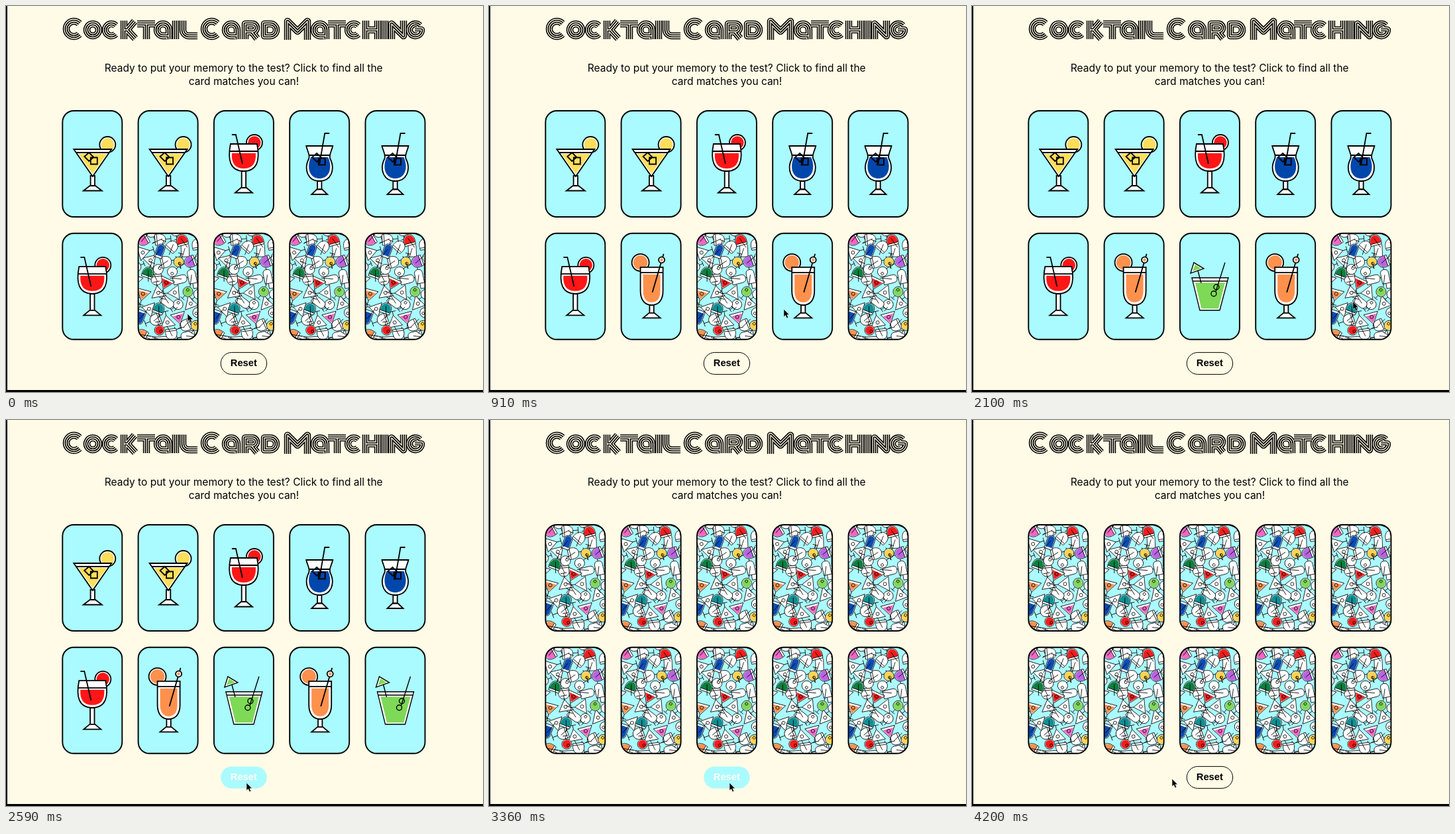
An HTML page for the animation above (4270 ms loop, 720x582 px).

```html
<!DOCTYPE html>
<html lang="en">
<head>
<meta charset="utf-8">
<title>Cocktail Card Matching</title>
<style>
  html, body { margin: 0; width: 100%; height: 100%; overflow: hidden; background: #fffbe6; }
  svg { display: block; }
  .intro { font: 15.5px Inter, "Open Sans", sans-serif; text-anchor: middle; }
  .label { font: bold 14.7px "Liberation Sans", Arial, sans-serif; text-anchor: middle; }
  .hidden-text { font: 44px Inter, sans-serif; text-anchor: middle; fill: transparent; }
</style>
</head>
<body>
<svg id="stage" width="720" height="582" viewBox="0 0 720 582">
  <defs>
    <clipPath id="cardClip"><rect x="-45" width="90" height="160" rx="17"/></clipPath>
  </defs>
  <rect width="720" height="582" fill="#fffbe6"/>
  <g id="title" fill="none" stroke-linejoin="round" aria-hidden="true"></g>
  <text class="hidden-text" x="359" y="50">Cocktail Card Matching</text>
  <text class="intro" x="358.7" y="99">Ready to put your memory to the test? Click to find all the</text>
  <text class="intro" x="359" y="119">card matches you can!</text>
  <g id="cards"></g>
  <rect id="button" x="324.2" y="522.4" width="69.4" height="33" rx="16.5"/>
  <text id="label" class="label" x="358.8" y="543">Reset</text>
  <path d="M0 0H2V582H0ZM0 579H720V582H0Z"/>
  <path id="cursor" d="M0 0V11.5L2.6 9.2 4.6 13.5 6.7 12.6 4.8 8.4H8.3Z" stroke="#fff" stroke-width=".5"/>
</svg>
<script>
const LOOP = 4270, STEP = 70, RESET = 3360;
const AQUA = '#aafbff', PAPER = '#fffbe6';
const byId = id => document.getElementById(id);

function add(parent, tag, attrs) {
  const el = document.createElementNS('http://www.w3.org/2000/svg', tag);
  for (const key in attrs) el.setAttribute(key, attrs[key]);
  return parent.appendChild(el);
}

// Title lettering: centre lines drawn as nested strokes.
const glyphs = {
  C: 'M19.6 3.4A11.5 11.5 0 1 0 19.6 19.6',
  M: 'M0 28V0L15 15L30 0V28',
  o: 'M9 0a9 9 0 1 0 .01 0Z',
  c: 'M15.4 2.6A9 9 0 1 0 15.4 15.4',
  k: 'M0 -5V23M0 9H5L16 -4M5 9L17 22',
  t: 'M-5 0H22M9 0V23',
  a: 'M18 23V9A9 9 0 1 0 9 18H18',
  i: 'M0 -5V23',
  l: 'M0 -5V9a9 9 0 0 0 9 9H22',
  r: 'M0 23V0H11a6 6 0 0 1 0 12H0M10 12L18 22',
  d: 'M0 0H9a9 9 0 0 1 0 18H0Z',
  h: 'M0 -5V23M18 -5V23M0 9H18',
  n: 'M0 23V0L18 18V-5',
  g: 'M15.4 2.6A9 9 0 1 0 18 9H8'
};
const lettering = 'CocktailCardMatching';
const letterX = [86, 117, 145, 173, 198, 223, 251, 262, 294, 326, 356, 385,
  420, 460, 486, 511, 538, 567, 577, 604];
[[10.4, '#000'], [7.3, PAPER], [4.7, '#000'], [1.3, PAPER]].forEach(([width, stroke]) => {
  const layer = add(byId('title'), 'g', { stroke, 'stroke-width': width });
  [...lettering].forEach((ch, i) => {
    const top = ch < 'a' ? 23 : 27;
    add(layer, 'path', { d: glyphs[ch], transform: `translate(${letterX[i] + 5} ${top})` });
  });
});

// Shapes for the card faces; x is measured from the card's centre line.
const line = (d, fill = 'none') => `<path d="${d}" fill="${fill}"/>`;
const solid = (d, fill) => `<path d="${d}" fill="${fill}" stroke="none"/>`;
const ring = (x, y, r, fill = 'none') => `<circle cx="${x}" cy="${y}" r="${r}" fill="${fill}"/>`;
const slice = (x, y, r, color) => ring(x, y, r, '#fff') +
  `<circle cx="${x}" cy="${y}" r="${r - 2.3}" fill="${color}" stroke="none"/>`;
const foot = (x, top, knee, half) => line(`M${x - 3.2} ${top}H${x + 3.2}V${knee}H${x - 3.2}Z`, '#fff') +
  line(`M${x - 4} ${knee}H${x + 4}L${x + half} ${knee + 7.5}H${x - half}Z`, '#fff');
const ice = (x, y) => line(`M${x} ${y}l7 -6 7 7 -7 6zM${x + 9.5} ${y + 1.5}h10v10h-10z`);

const drinks = {
  martini: slice(23, 51, 12, '#ffde59') + foot(.5, 98, 113, 14) +
    line('M-28 58H29L.5 99Z', '#fff') + solid('M-21 65H22L.5 95Z', '#ffde59') +
    line('M-24.5 63H25.5') + ice(-12, 69),
  wine: slice(16, 48, 12, '#ff1616') + foot(0, 91, 116, 13) +
    line('M-20 50H20C25 75 20 91 0 91S-25 75 -20 50Z', '#fff') +
    solid('M-18 64H18C19 79 13 87 0 87S-19 79 -18 64Z', '#ff1616') +
    line('M-21.5 61H21.5M-18 36H-12L-2 80'),
  hurricane: foot(0, 106, 118.5, 12) +
    line('M-20 53H20C18 62 14 66 16 72C24 88 18 106 0 106S-24 88 -16 72C-14 66 -18 62 -20 53Z', '#fff') +
    solid('M-13 70H13C20 86 15 102 0 102S-20 86 -13 70Z', '#0047ab') +
    line('M-15.5 67H15.5M15 34H8L0 80') + ice(-11, 70),
  flute: slice(-16, 44, 13, '#ff914d') + foot(1, 108, 120, 13) +
    line('M-16 51H18V87C18 101 11 108 1 108S-16 101 -16 87Z', '#fff') +
    solid('M-12 62H14V87C14 98 9 104 1 104S-12 98 -12 87Z', '#ff914d') +
    line('M-16 59H18M19 31L2 89') + slice(16, 40, 4.5, '#ff914d'),
  tumbler: `<g stroke-width="1.4">` + line('M-27 67H28L15 116H-15Z', '#fff') +
    solid('M-22 74.5H23L13 113.5H-12.5Z', '#7ed957') + line('M-25.5 72H26.5') +
    line('M-24 44L-29 60L-9 53Z', '#fff') + solid('M-22 47L-26 57L-13 53Z', '#7ed957') +
    line('M-18 56L-13 75M23 44L9 88') + ring(10, 81, 4) + ring(6, 91, 4) + '</g>'
};

// Small glasses for the card backs.
const minis = {
  w: c => line('M-8 -8H8C10 3 6 8 0 8S-10 3 -8 -8Z', '#fff') +
    solid('M-8 -5H8C8 3 5 7 0 7S-8 3 -8 -5Z', c) +
    line('M-8 -5H8M0 8V16M-5 16H5M-5 -13L1 3'),
  m: c => line('M-11 -7H11L0 10Z', '#fff') + solid('M-8 -4H8L0 8Z', c) +
    line('M0 10V16M-5 16H5') + ring(0, -1, 2.5),
  f: c => line('M-6 -11H6V4Q6 10 0 10T-6 4Z', '#fff') +
    solid('M-5 -8H5V4Q5 9 0 9T-5 4Z', c) + line('M0 10V16M-4 16H4M6 -15L0 2'),
  o: c => ring(0, 0, 7.5, '#fff') + solid('M-6.5 0a6.5 6.5 0 1 0 13 0a6.5 6.5 0 1 0 -13 0', c) +
    line('M0 7V13M-4 13H4') + ring(-2, -2, 2)
};
const mini = (kind, x, y, turn, color) =>
  `<g transform="translate(${x.toFixed(1)} ${y.toFixed(1)}) rotate(${turn.toFixed(0)})">${minis[kind](color)}</g>`;

const accents = [
  ['w', -38, 10, 60, '#f266c4'], ['w', 21, 10, 165, '#f21d1d'], ['f', -12, 26, 200, '#0b4db3'],
  ['o', 16, 43, 195, '#ffd34f'], ['w', 33, 43, 70, '#b964e0'], ['w', -30, 59, 200, '#0c8040'],
  ['m', -3, 75, 25, '#f21d1d'], ['m', -38, 92, 15, '#ff914d'], ['o', 30, 88, 40, '#7ed957'],
  ['w', -14, 113, 200, '#0e8f95'], ['m', 16, 127, 345, '#f266c4'], ['f', -42, 127, 20, '#0b4db3'],
  ['o', -13, 146, 170, '#f21d1d'], ['o', 42, 139, 30, '#ffd34f'], ['w', -40, 153, 120, '#ff914d']
];

// White glasses are scattered at random, each keeping its distance from the rest.
function cardBack() {
  let seed = 11;
  const random = () => (seed = seed * 16807 % 2147483647) / 2147483647;
  const glasses = [...accents];
  for (let i = 0; i < 1500; i++) {
    const x = random() * 100 - 50, y = random() * 170 - 5;
    if (glasses.some(g => Math.hypot(g[1] - x, g[2] - y) < 15)) continue;
    glasses.unshift(['wmfo'[Math.floor(random() * 4)], x, y, random() * 360, '#fff']);
  }
  const shapes = glasses.map(g => mini(...g)).join('');
  return `<g clip-path="url(#cardClip)" stroke-width=".8">${shapes}</g>`;
}

// Cards: a drink and the moment it is turned over.
const deck = [
  ['martini', 0], ['martini', 0], ['wine', 0], ['hurricane', 0], ['hurricane', 0],
  ['wine', 0], ['flute', 140], ['tumbler', 1540], ['flute', 770], ['tumbler', 2170]
];
const back = cardBack();
const cards = deck.map(([drink, opens], i) => {
  const x = 130.3 + i % 5 * 114.3, y = i < 5 ? 158 : 342.8;
  const card = add(byId('cards'), 'g', { transform: `translate(${x} ${y})`, stroke: '#000' });
  const rect = { x: -45, width: 90, height: 160, rx: 17 };
  add(card, 'rect', { ...rect, fill: AQUA, stroke: 'none' });
  const front = add(card, 'g', { 'stroke-width': 1.8 });
  front.innerHTML = drinks[drink];
  const rear = add(card, 'g', {});
  rear.innerHTML = back;
  add(card, 'rect', { ...rect, fill: 'none', 'stroke-width': 1.9 });
  return { opens, front, rear };
});

// Pointer stops: time, x, y.
const stops = [
  [0, 274, 464], [140, 274, 464], [600, 449, 457], [840, 449, 457], [1330, 376, 460],
  [1610, 376, 460], [2080, 575, 446], [2170, 575, 446], [2240, 446, 512], [2520, 363, 547],
  [3800, 363, 547], [4200, 302, 541], [LOOP, 302, 541]
];

function pointerAt(t) {
  const next = stops.findIndex(s => s[0] > t);
  const [t0, x0, y0] = stops[next - 1], [t1, x1, y1] = stops[next];
  const u = (t - t0) / (t1 - t0), k = u * u * (3 - 2 * u);
  return [x0 + (x1 - x0) * k, y0 + (y1 - y0) * k];
}

function render(t) {
  const [x, y] = pointerAt(t);
  const hover = x > 324 && x < 394 && y > 522 && y < 556;
  byId('cursor').setAttribute('transform', `translate(${x} ${y})`);
  byId('button').setAttribute('fill', hover ? AQUA : PAPER);
  byId('button').setAttribute('stroke', hover ? 'none' : '#000');
  byId('label').setAttribute('fill', hover ? '#fff' : '#000');
  for (const { opens, front, rear } of cards) {
    const open = t >= opens && t < RESET;
    front.style.display = open ? '' : 'none';
    rear.style.display = open ? 'none' : '';
  }
}

const start = performance.now();
function tick() {
  const t = (performance.now() - start) % LOOP;
  render(Math.floor(t / STEP) * STEP);
  requestAnimationFrame(tick);
}
tick();
</script>
</body>
</html>
```
